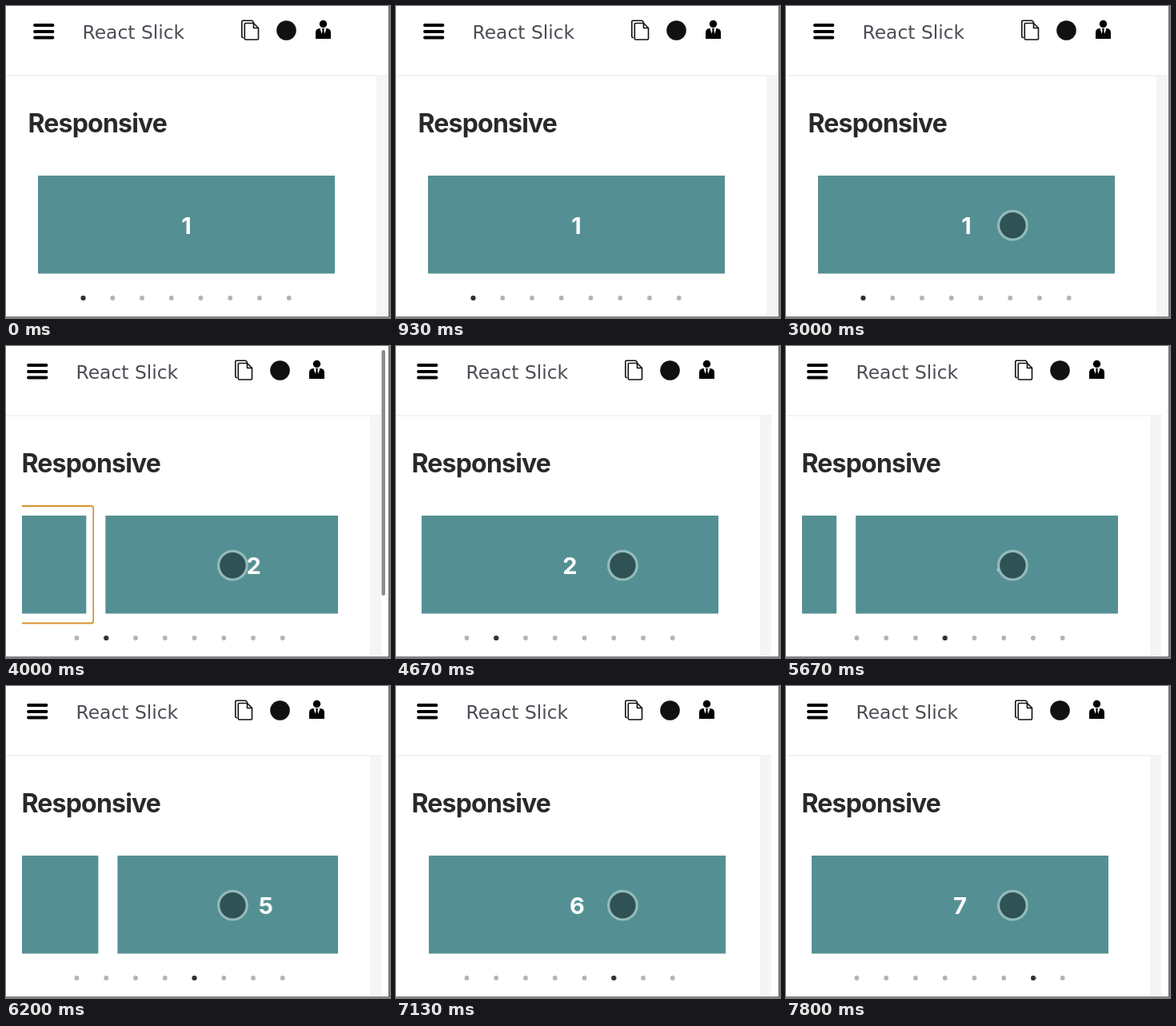
Write an HTML page that moves like this. It is 480 px wide and 390 px high and loops after 8 s.

```html
<!DOCTYPE html>
<html lang="en">
<head>
<meta charset="utf-8">
<title>Responsive carousel</title>
<style>
  html, body { margin: 0; width: 100%; height: 100%; overflow: hidden; background: #fff; }
  svg { display: block; width: 480px; height: 390px; }
  .brand { font: 23.4px "DejaVu Sans", sans-serif; fill: #4d4c55; }
  .title { font: 700 32px Inter, sans-serif; letter-spacing: -.8px; fill: #29292b; }
  .num { font: 700 29px Inter, sans-serif; fill: #fff; text-anchor: middle; }
  .slide { fill: #549093; }

  #page, #track, #active, #ring, #thumb, #touch { animation: 8s infinite; }
  #page { animation-name: nudge; }
  #track { animation-name: slide; }
  #active { animation-name: dot; animation-timing-function: step-end; }
  #ring { animation-name: ring; animation-timing-function: step-end; }
  #touch { animation-name: touch; animation-timing-function: step-end; }
  #thumb { animation-name: thumb; animation-timing-function: linear; }

  @keyframes nudge {
    0%, 47.3% { transform: none; }
    49%, 100% { transform: translateX(-8px); }
  }
  /* each move is a 500 ms ease */
  @keyframes slide {
    0%, 47.1% { transform: none; }
    53.35%, 58.6% { transform: translateX(-395px); }
    64.85%, 67.35% { transform: translateX(-790px); }
    73.6%, 74.8% { transform: translateX(-1185px); }
    81.05%, 84.1% { transform: translateX(-1580px); }
    90.35%, 91.3% { transform: translateX(-1975px); }
    97.55%, 100% { transform: translateX(-2370px); }
  }
  @keyframes dot {
    0% { transform: none; }
    47.4% { transform: translateX(36.75px); }
    58.6% { transform: translateX(73.5px); }
    67.4% { transform: translateX(110.25px); }
    74.8% { transform: translateX(147px); }
    84.1% { transform: translateX(183.75px); }
    91.3%, 100% { transform: translateX(220.5px); }
  }
  @keyframes ring { 0% { opacity: 0; } 47.4%, 100% { opacity: 1; } }
  @keyframes touch { 0% { opacity: 0; } 30%, 100% { opacity: 1; } }
  @keyframes thumb {
    0%, 47.4% { opacity: 0; }
    48.2%, 53.5% { opacity: 1; }
    57.5%, 100% { opacity: 0; }
  }
</style>
</head>
<body>
<svg viewBox="0 0 480 390">
  <defs>
    <clipPath id="view"><rect x="28" y="190" width="395" height="165"/></clipPath>
  </defs>
  <rect width="480" height="390" fill="#fff"/>

  <g id="page">
    <rect x="463" y="87" width="14" height="302" fill="#f5f5f5"/>
    <rect x="-10" y="86" width="488" height="2" fill="#f3f3f3"/>

    <path d="M36 24h22.5M36 32h22.5M36 39.5h22.5" stroke="#000" stroke-width="3.8" stroke-linecap="round"/>
    <text class="brand" x="95.5" y="40.5">React Slick</text>

    <g fill="#fff" stroke="#111" stroke-width="1.6" stroke-linejoin="round">
      <path d="M297 39.5h-1.2q-1-.2-1-1.2V19.5q0-1.2 1.2-1.2h11.5l2.5 2.5"/>
      <path d="M299.5 21.5h10l6 6v13.300q0 1.200-1.200 1.200h-14.800q-1.200 0-1.200-1.200v-18q0-1.300 1.200-1.300z"/>
      <path d="M309.500 21.500v6h6" fill="none"/>
    </g>
    <circle cx="350.500" cy="30.500" r="12.300" fill="#111"/>
    <g>
      <circle cx="396.500" cy="22.500" r="4.700"/>
      <path d="M387 41v-8q0-4 4-4.800l2.500-.4 3 3 3-3 2.500.4q4 .8 4 4.800v8z"/>
      <path d="M392.500 28.500l4 11 4-11-2.500-.8h-3z" fill="#fff"/>
      <path d="M395 28h3l-.6 2.500 1.200 5.500-2.100 3.500-2.100-3.500 1.200-5.500z"/>
    </g>

    <text class="title" x="27.500" y="158">Responsive</text>

    <g clip-path="url(#view)">
      <g id="track">
        <g id="slides"></g>
        <rect id="ring" x="27" y="200" width="393.500" height="146.500" rx="3" fill="none" stroke="#d6932f" stroke-width="2"/>
      </g>
    </g>

    <g id="dots" fill="#b3b3b3"></g>
    <circle id="active" cx="96.500" cy="365" r="3.100" fill="#2f2f2f"/>
  </g>

  <rect id="thumb" x="469.500" y="5" width="4.500" height="307" rx="2.200" fill="#8c8c8c"/>
  <circle id="touch" cx="283.400" cy="274.200" r="17.800" fill="#2f5255" stroke="#93babb" stroke-width="3.200"/>
  <path d="M479 0V389H0" fill="none" stroke="#5c5c5c" stroke-width="1.700"/>
</svg>
<script>
  const PITCH = 395, COUNT = 8;
  const add = (parent, tag, attrs, text = "") => {
    const el = document.createElementNS("http://www.w3.org/2000/svg", tag);
    for (const key in attrs) el.setAttribute(key, attrs[key]);
    el.textContent = text;
    parent.append(el);
  };
  const slides = document.getElementById("slides");
  const dots = document.getElementById("dots");
  for (let i = 0; i < COUNT; i++) {
    const x = 40 + i * PITCH;
    add(slides, "rect", { class: "slide", x, y: 212, width: 371, height: 122.5 });
    add(slides, "text", { class: "num", x: x + 185.5, y: 284.5 }, i + 1);
    add(dots, "circle", { cx: 96.5 + i * 36.75, cy: 365, r: 2.9 });
  }
  // the outline belongs to the first slide and is painted above it
  document.getElementById("ring").setAttribute("x", 26.5);
</script>
</body>
</html>
```
